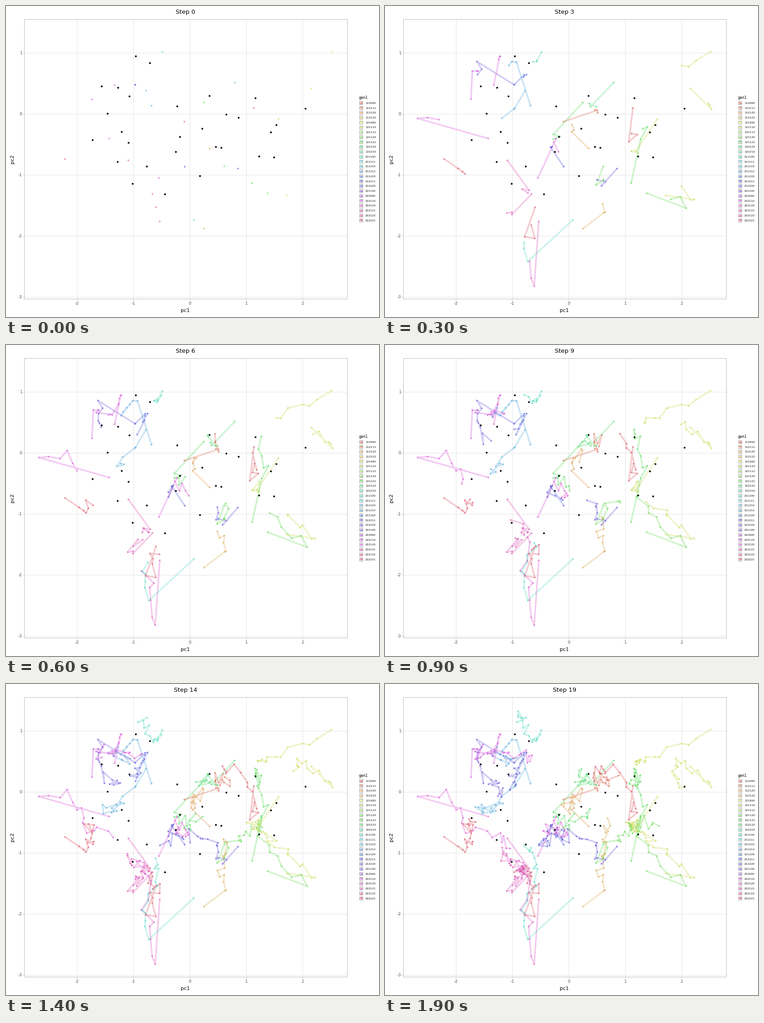
Write a matplotlib script that moves like this. It is 820 px wide and 683 px high and loops after 2000 ms.

```python
import colorsys

import matplotlib.pyplot as plt
import numpy as np
from matplotlib.animation import FuncAnimation
from matplotlib.collections import LineCollection
from matplotlib.patches import Rectangle

W, H, DPI = 820, 683, 64
PT = 72 / DPI  # points per pixel
STEPS = 20
LEFT, RIGHT, TOP, BOTTOM = 40, 750, 29, 643

# regions where the walks gather
LIME, GREEN, CORAL = (545, 308), (430, 203), (500, 208)
CORE, VIOLET, BLUE = (376, 325), (238, 150), (280, 225)
RED, PINK, SKY = (195, 305), (298, 402), (238, 278)

plt.rcParams["font.family"] = "DejaVu Sans"
rng = np.random.default_rng(12)
paths, hues = [], []


def tint(hue, alpha):
    return (*colorsys.hls_to_rgb(hue / 360, 0.6, 0.65), alpha)


def walk(hue, start, *stops, wobble=8.5):
    """Jump to the first stop, then wander past the others, slowing down."""
    t = np.linspace(0, 1, STEPS - 1)
    along = (1 - (1 - t) ** 1.6) * (len(stops) - 1)
    drift = [np.interp(along, range(len(stops)), axis) for axis in zip(*stops)]
    noise = np.clip(rng.normal(0, wobble, (STEPS - 1, 2)), -2 * wobble, 2 * wobble)
    noise[0] = 0
    paths.append(np.vstack([start, np.transpose(drift) + noise]))
    hues.append(hue)


# right
walk(65, (716, 100), (684, 120), (604, 155), (560, 165), (553, 180), wobble=6)
walk(65, (671, 181), (718, 227), (690, 203), (632, 155), (648, 225), wobble=7)
walk(68, (599, 248), (552, 318), LIME)
walk(66, (617, 416), (680, 425), (600, 365), LIME)
walk(110, (575, 411), (662, 444), (600, 385), LIME, (592, 305))
walk(112, (480, 352), (464, 393), LIME)
walk(120, (541, 389), (562, 293), (553, 200), (548, 210))
walk(355, (545, 224), (536, 298), (558, 260), (500, 180), (461, 195), wobble=7)

# centre
walk(135, (503, 168), (452, 221), GREEN)
walk(125, (435, 212), (370, 282), (390, 312), (445, 285))
walk(10, (392, 254), (467, 229), (464, 207), CORAL)
walk(34, (448, 313), (410, 276), (428, 235), (400, 280))
walk(39, (435, 489), (481, 454), (474, 400), (488, 310))
walk(246, (510, 357), (476, 395), (458, 350), CORE)
walk(238, (393, 353), (364, 310), CORE, (348, 348))
walk(304, (336, 378), (376, 292), (405, 338), (352, 318))

# upper left
walk(167, (344, 101), (334, 120), (325, 120), (290, 62), wobble=6)
walk(200, (308, 186), (284, 226), SKY, (215, 275))
walk(204, (320, 219), (289, 123), VIOLET, (282, 165))
walk(254, (284, 173), (202, 122), (215, 205), (262, 235))
walk(235, (284, 173), (306, 151), BLUE)
walk(300, (239, 174), (252, 111), VIOLET, (325, 165))
walk(292, (189, 205), (192, 143), VIOLET, (200, 150))

# lower left
walk(302, (227, 291), (72, 247), (150, 244), (180, 315), (275, 348))
walk(352, (130, 336), (171, 364), RED)
walk(315, (269, 339), (317, 405), PINK, (256, 375))
walk(316, (322, 413), (279, 458), PINK)
walk(350, (330, 442), (307, 507), (338, 445), PINK)
walk(310, (338, 473), (328, 615), (308, 520), PINK, PINK)
walk(170, (413, 470), (314, 561), (302, 485), (340, 415), (318, 360), wobble=6)

paths = np.array(paths)

BLACK = [(285, 110), (316, 124.5), (210, 176), (246, 179), (271, 198), (222.5, 236),
         (190, 293.5), (254, 275.5), (268.5, 299.5), (245, 342), (308.5, 352),
         (278, 390), (349, 413), (375.5, 220), (382, 287), (373, 320), (430.5, 268.5),
         (446.5, 196.5), (484, 238), (511, 244.5), (461, 308.5), (473, 311),
         (426, 373), (548, 201.5), (594, 261), (582, 277), (555.5, 330),
         (588.5, 331.5), (657.5, 224.5)]

CODES = ("112000 112111 112120 112122 121000 121110 121112 121120 121121 122122 "
         "122210 211100 211111 211210 211212 211220 212211 212220 221100 222000 "
         "222110 222120 222121 222122 222221").split()

fig = plt.figure(figsize=(W / DPI, H / DPI), dpi=DPI, facecolor="white")
ax = fig.add_axes([0, 0, 1, 1])
ax.set(xlim=(0, W), ylim=(H, 0))
ax.axis("off")


def label(x, y, s, px, color="black", **kw):
    kw = {"ha": "center", "va": "center", **kw}
    return ax.text(x, y, s, fontsize=px * PT, color=color, **kw)


def rule(xs, ys, color, width=1, **kw):
    ax.plot(xs, ys, color=color, lw=width * PT, solid_capstyle="butt", **kw)


def dots(points, px, colors, z):
    return ax.scatter(*np.transpose(points), s=(px * PT) ** 2, c=colors,
                      linewidths=0, zorder=z)


# panel, grid and axis text
tick = dict(px=8.8, color="#4d4d4d", va="center_baseline")
for v in range(-2, 3):
    x = 404 + 124.1 * v
    rule([x, x], [TOP, BOTTOM], "#dedede", 0.8, zorder=0)
    rule([x, x], [BOTTOM, BOTTOM + 3], "#b3b3b3", 0.7)
    label(x, 652, str(v), **tick)
for v in range(-3, 2):
    y = 236.5 - 134 * v
    rule([LEFT, RIGHT], [y, y], "#dedede", 0.8, zorder=0)
    rule([LEFT - 3, LEFT], [y, y], "#b3b3b3", 0.7)
    label(35.5, y + 0.5, str(v), ha="right", **tick)
ax.add_patch(Rectangle((LEFT, TOP), RIGHT - LEFT, BOTTOM - TOP, fill=False,
                       ec="#b3b3b3", lw=0.9 * PT, zorder=1))
label(394.5, 669.5, "pc1", 11)
label(13.5, 336.5, "pc2", 11, rotation=90)
title = label(394.5, 14, "", 13.2)

# legend
label(776, 201, "gen1", 8, ha="left")
for i, code in enumerate(CODES):
    y = 212.5 + 10.74 * i
    hue = 3.6 + 360 * i / len(CODES)
    ax.add_patch(Rectangle((777, y - 3.6), 7.2, 7.2, fc="white", ec="#8c8c8c",
                           lw=0.8 * PT))
    rule([777.4, 783.8], [y, y], tint(hue, 0.35), 4.5)
    dots([(780.6, y)], 3.8, [tint(hue, 0.65)], 3)
    label(790, y + 0.3, code, 6, ha="left", va="center_baseline")

trails = LineCollection([], colors=[tint(h, 0.3) for h in hues],
                        linewidths=3.6 * PT, zorder=2)
ax.add_collection(trails, autolim=False)
marks = dots(paths[:, 0], 3.6, [tint(h, 0.65) for h in hues], 3)
dots(BLACK, 4, "black", 4)


def draw(step):
    shown = paths[:, :step + 1]
    trails.set_segments(list(shown) if step else [])
    marks.set_offsets(shown.reshape(-1, 2))
    marks.set_facecolors([tint(h, 0.65) for h in hues for _ in range(step + 1)])
    title.set_text(f"Step {step}")
    return trails, marks, title


anim = FuncAnimation(fig, draw, frames=STEPS, interval=100, repeat=True,
                     repeat_delay=0, blit=False)
plt.show()
```
